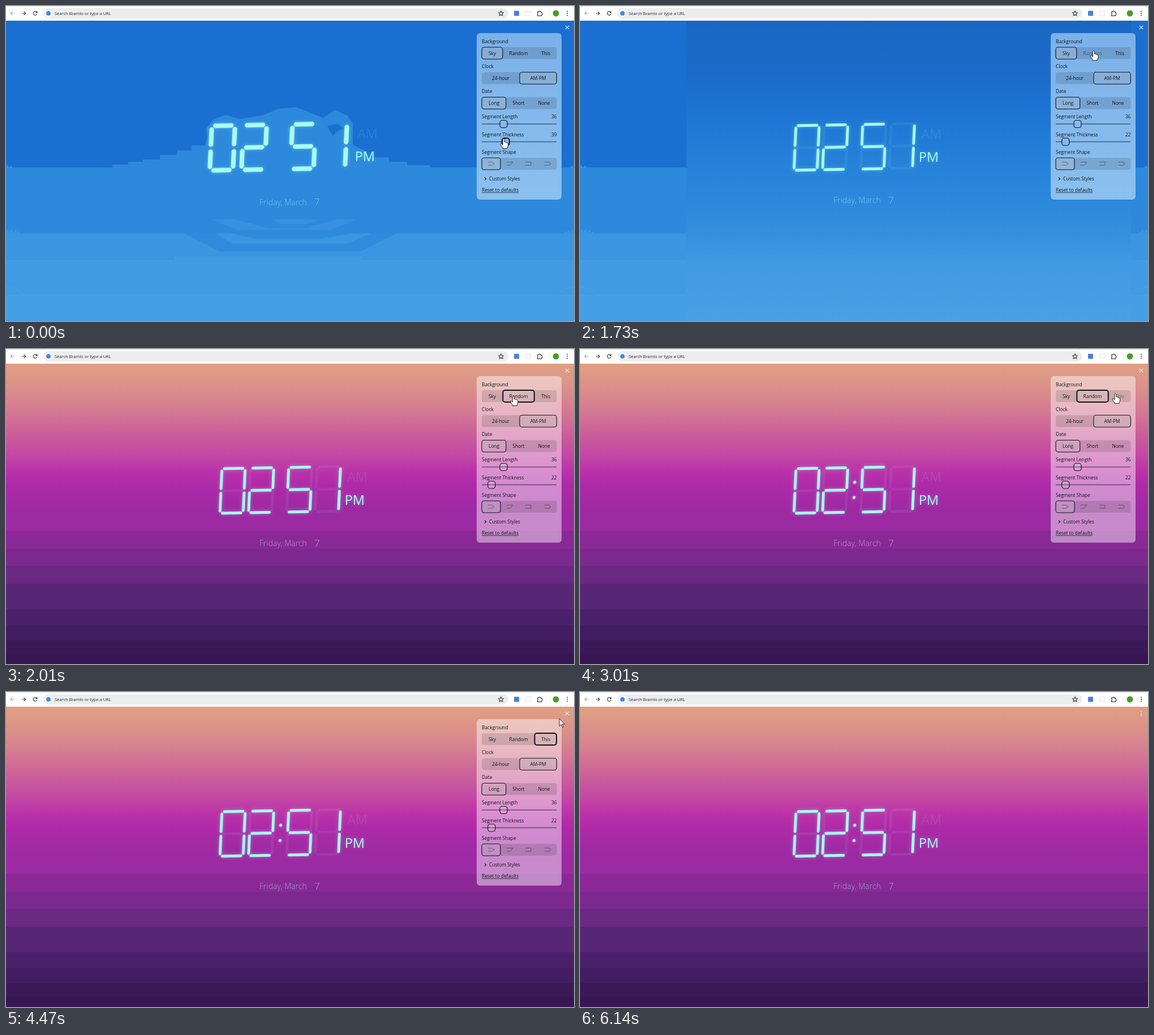
Write an HTML page that moves like this. It is 1004 px wide and 558 px high and loops after 6.79 s.

```html
<!DOCTYPE html>
<html lang="en">
<head>
<meta charset="utf-8">
<title>Segment clock</title>
<style>
  html, body { margin: 0; width: 100%; height: 100%; overflow: hidden; background: #fff; }
  svg { display: block; width: 1004px; height: 558px; }
  text { font-family: "Open Sans", "Noto Sans", sans-serif; }
  .ui { font-size: 8.35px; fill: #10151c; }
  .mid { text-anchor: middle; }
  .end { text-anchor: end; }
  .group { fill: #000; fill-opacity: .12; }
  .pick { fill: #fff; fill-opacity: .17; stroke: #10151c; stroke-width: 1.1; }
  .track { stroke: #000; stroke-opacity: .5; stroke-width: 1.6; }
  .knob { stroke: #10151c; stroke-width: 1.2; }
  .icon { fill: none; stroke: #000; stroke-opacity: .5; stroke-width: .8; }
  .bar { fill: none; stroke: #3c4043; stroke-width: 1.2; }
  .aqua { fill: #a7fdf0; }
  .lit { filter: drop-shadow(0 0 3px rgba(167, 253, 240, .35)); }
  .date { font-family: Inter, Lato, sans-serif; font-weight: 300; font-size: 13.8px; letter-spacing: .12px; fill-opacity: .58; }
</style>
</head>
<body>
<svg viewBox="0 0 1004 558" xmlns="http://www.w3.org/2000/svg">
  <defs id="defs"></defs>

  <g id="sky">
    <rect y="26" width="1004" height="262" fill="#1a6fd0"/>
    <rect y="286" width="1004" height="118" fill="#2c89dc"/>
    <rect y="403" width="1004" height="155" fill="#3b95e0"/>
    <rect y="450" width="1004" height="108" fill="#429ae2"/>
    <rect y="512" width="1004" height="46" fill="#469ee4"/>
    <path d="M0 287l2-7 3 7 4-5 3 5zM0 404l3-10 3 8 5-8 1 8 7-7-1 7 8-3-4 5zM1004 404l-3-9-3 7-5-6 0 6-8-4 4 6zM1004 287l-4-5-3 5z" fill="#3b95e0"/>
    <path d="M0 498q22 2 28 13H976q6-11 28-13" fill="none" stroke="#58a9e8" stroke-opacity=".45"/>
    <g id="early">
      <path d="M188 288V281h28v-5h26v-4h30v-8h30v-8h26v-9h24l4-14-2-16 12-16 22-8 25 7 40-6 28-12 32-3 30 12 18 7 20-14 22 10 10 14 0 38 24 12v10h40v8h32v6h41v6h170v5z" fill="#2c89dc"/>
      <path d="M568 212l18-3 12 8-13 5-7 8-6-9z" fill="#1a6fd0"/>
      <path d="M363 378h42l58 15h70l50-15h37l-46 19H410zM470 378h90l-28 8h-46z" fill="#3990de"/>
      <path d="M315 403l62 31H628l62-31h-44l-44 18H400l-30-18zM400 403l40 9H560l48-9z" fill="#2f8bdc"/>
      <rect x="298" y="444" width="330" height="5" fill="#439be2"/>
    </g>
    <rect id="late" x="188" y="26" width="786" height="532" fill="url(#gSky)"/>
  </g>
  <rect id="sun" y="26" width="1004" height="532" fill="url(#gSun)"/>

  <rect width="1004" height="26" fill="#fff"/>
  <rect width="1004" height="1" fill="#e4e4e6"/>
  <rect x="66" y="4" width="822" height="18" rx="9" fill="#ededef"/>
  <circle cx="75" cy="13" r="6.8" fill="#fff"/>
  <circle cx="75" cy="13" r="4" fill="#4285f4"/>
  <text x="86" y="15.6" font-size="7.5" fill="#26282b">Search Bramlo or type a URL</text>
  <path class="bar" stroke-opacity=".45" d="M15 13H8.5M11.5 9.8 8.3 13l3.2 3.2"/>
  <path class="bar" d="M28 13h6.5M31.5 9.8l3.2 3.2-3.2 3.2M54.3 11.2a3.3 3.3 0 1 0 .4 2.6M54.9 9.3v2.6h-2.6"/>
  <path class="bar" stroke-width="1" d="M875 8.6l1.3 2.9 3.1.3-2.3 2.1.7 3.1-2.8-1.6-2.8 1.6.7-3.1-2.3-2.1 3.1-.3z"/>
  <rect x="898" y="8.5" width="9" height="9" rx="1" fill="#4b7fd6"/>
  <rect x="919" y="9" width="8" height="8" fill="none" stroke="#e0e0e2"/>
  <path class="bar" d="M939.5 10.3h2.2a1.4 1.4 0 0 1 2.8 0h2.2v2.2a1.4 1.4 0 0 1 0 2.8v2h-7.2v-2.2a1.5 1.5 0 0 0 0-2.8z"/>
  <path d="M961 9v8" stroke="#dce4f4"/>
  <circle cx="972" cy="13" r="5.5" fill="#4c9a2a"/>
  <g fill="#3c4043"><circle cx="992" cy="9.6" r="1"/><circle cx="992" cy="13" r="1"/><circle cx="992" cy="16.4" r="1"/></g>

  <g transform="matrix(1 -.018 -.045 1 505 249.2)" class="aqua">
    <path id="ghost" fill-opacity=".08"/>
    <path id="digits" class="lit"/>
    <g id="colon" class="lit"><circle cy="-13.5"/><circle cy="13.5"/></g>
  </g>
  <g id="half" class="aqua" font-size="23.5">
    <text id="am" y="235" fill-opacity=".11">AM</text>
    <text class="lit" y="276" x="-2.3">PM</text>
  </g>
  <g id="date" class="aqua date"><text x="448">Friday, March</text><text x="545" y=".6" font-size="17">7</text></g>

  <g id="panel">
    <rect x="832" y="48" width="150" height="295" rx="6" fill="url(#gPanel)"/>
    <g id="warm">
      <rect x="832" y="48" width="150" height="295" rx="6" fill="url(#gSun)"/>
      <rect x="832" y="48" width="150" height="295" rx="6" fill="#fff" fill-opacity=".45"/>
    </g>
    <g id="controls"></g>
    <path d="M988.8 34.8l6.4 6.4M995.2 34.8l-6.4 6.4" stroke="#cdf8fa" stroke-width="1.2"/>
  </g>
  <g id="menu" fill="#b9f3ee"><circle cx="992" cy="34.7" r="1.1"/><circle cx="992" cy="38.2" r="1.1"/><circle cx="992" cy="41.7" r="1.1"/></g>

  <g id="cursor" fill="#fff" stroke="#111" stroke-width=".9" stroke-linejoin="round">
    <path id="hand" d="M-1.5 1.2Q0-1 1.5 1.2V6q1.6-.9 2.3.5 1.7-.6 2.2.8 1.8-.3 2 1.4V12q0 2-1.4 3.600V17.500H-1.800V15.800Q-3.500 14-5.300 10.300q-.6-1.800 1.300-1.600L-1.500 11z"/>
    <path id="arrow" d="M0 0V13.500l3.100-2.900 2.200 5 2-.9-2.200-4.800h4.300z"/>
  </g>
</svg>
<script>
const $ = id => document.getElementById(id);
const LOOP = 6790;
// Moments at which the picture is refreshed
const TICKS = [0, 150, 280, 410, 540, 660, 790, 910, 1050, 1180, 1330, 1460, 1600, 1730, 1860, 2010, 2150, 2310,
  2440, 2590, 2730, 2870, 3010, 3170, 3320, 3470, 3590, 3730, 3880, 4030, 4180, 4330, 4470, 4600,
  4720, 4860, 5010, 5150, 5290, 5440, 5580, 5720, 5870, 6000, 6140];
const POINTER = [[0, 879.5, 235], [150, 877, 236], [540, 859, 238], [660, 858, 238], [790, 861, 238.5], [910, 866, 228],
  [1050, 888, 140], [1180, 903, 68], [1330, 906, 76], [1730, 908, 79], [1860, 896.5, 83], [2440, 898, 83],
  [3010, 946.5, 79], [3320, 948, 81], [3880, 950, 81], [4180, 958, 72], [4470, 978, 47], [4600, 981, 43],
  [4720, 986, 37], [5290, 989, 35], [5580, 972, 40], [5720, 946, 51], [5870, 800, 190], [6000, 620, 329]];
const THICKNESS = [[0, 39], [150, 36], [540, 21], [660, 20], [790, 22]];
const RANDOM_AT = 1733, THIS_AT = 3190, CLOSE_AT = 5150;

const clamp = v => Math.max(0, Math.min(1, v));
const mix = (a, b, p) => a + (b - a) * p;
const show = (id, on) => $(id).setAttribute('visibility', on ? 'inherit' : 'hidden');
const set = (id, attrs) => { for (const k in attrs) $(id).setAttribute(k, attrs[k]); };

function along(keys, t) {
  const i = keys.findIndex(k => k[0] > t);
  if (i < 0) return keys[keys.length - 1].slice(1);
  if (!i) return keys[0].slice(1);
  const a = keys[i - 1], b = keys[i], p = (t - a[0]) / (b[0] - a[0]);
  return a.slice(1).map((v, j) => mix(v, b[j + 1], p));
}

// Vertical gradient; stops from `flat` on become solid bands
function gradient(id, stops, flat = Infinity) {
  const stop = (y, c) => `<stop offset="${(y - 26) / 532}" stop-color="#${c}"/>`;
  const body = stops.map(([y, c], i) =>
    (i && y >= flat ? stop(y, stops[i - 1][1]) : '') + stop(y, c)).join('');
  $('defs').innerHTML += `<linearGradient id="${id}" gradientUnits="userSpaceOnUse" x1="0" x2="0" y1="26" y2="558">${body}</linearGradient>`;
}
gradient('gSky', [[26, '1a67c2'], [130, '1b6ccb'], [200, '1e76d4'], [285, '2682d9'], [350, '2c89dc'],
  [403, '358fdd'], [460, '429ae2'], [558, '4aa0e4']]);
gradient('gSun', [[26, 'e0a083'], [60, 'dc9489'], [100, 'd67f90'], [150, 'cb5f9a'], [190, 'c346a5'], [215, 'bb33a8'],
  [240, 'ae2aa8'], [290, '9c2aa2'], [322, '8a2996'], [354, '7b298e'], [384, '6a2983'], [416, '572675'],
  [461, '4b216b'], [489, '431d62'], [516, '3b1957'], [540, '381653']], 322);
gradient('gPanel', [[48, '7bb1e9'], [343, '8bc0ef']]);

// Settings panel
const rect = (cls, x, y, w, h, extra = '') => `<rect class="${cls}" x="${x}" y="${y}" width="${w}" height="${h}" rx="4" ${extra}/>`;
const label = (x, y, s, cls = '', id = '') => `<text class="ui ${cls}" x="${x}" y="${y}" ${id && `id="${id}"`}>${s}</text>`;
const choices = (y, picked, names) => rect('group', 841, y, 132.5, 21) + rect('pick', ...picked) +
  names.map(([x, s, id]) => label(x, y + 13.6, s, 'mid', id)).join('');
const slider = (y, name, value, x, id) => label(841, y - 10, name) + label(973.5, y - 10, value, 'end', id + 'Value') +
  `<path class="track" d="M841 ${y}H973"/>` + rect('knob', x - 6.5, y - 6.5, 13, 13, `id="${id}Knob"`);
$('controls').innerHTML =
  label(841, 65.8, 'Background') +
  choices(73, [841, 73, 37, 21, 'id="choice"'], [[859.5, 'Sky'], [906, 'Random', 'random'], [954, 'This', 'this']]) +
  label(841, 110, 'Clock') + choices(117.3, [908, 117.3, 65.3, 21], [[874.5, '24-hour'], [940.5, 'AM-PM']]) +
  label(841, 154.300, 'Date') + choices(161.5, [841, 161.5, 42.7, 21], [[862.5, 'Long'], [906, 'Short'], [951, 'None']]) +
  slider(209, 'Segment Length', 36, 879.5, 'length') +
  slider(240.5, 'Segment Thickness', 39, 883.5, 'thick') +
  label(841, 262, 'Segment Shape') + choices(269, [841, 269, 33, 21], []) +
  '<path class="icon" d="M852 276.500h7l4 2.800-4 2.800h-7M885 276.500h11l-5 5.600h-6M918 276.500h10v5.600h-10M952 276.500h7.500a2.800 2.800 0 0 1 0 5.600H952"/>' +
  '<path d="M846 303.600l2.600 2.500-2.600 2.500" fill="none" stroke="#10151c" stroke-width="1.200"/>' +
  label(854, 309, 'Custom Styles') + label(841, 329, 'Reset to defaults') +
  '<path d="M841 330.600h65" stroke="#10151c" stroke-width=".7"/>';

// Seven segments: centre x, centre y, vertical?
const W = 20.5, H = 39.5;
const SEGMENTS = { a: [0, -H, 0], b: [W, -H / 2, 1], c: [W, H / 2, 1], d: [0, H, 0], e: [-W, H / 2, 1], f: [-W, -H / 2, 1], g: [0, 0, 0] };
const NUMBERS = ['abcdef', 'abged', 'afgcd', 'bc'];

function segment(cx, [x, y, upright], h) {
  const n = (upright ? H / 2 : W) - h * .5 - .5, s = n - h * .6, q = h * .4;
  const pts = [[-n, -q], [-s, -h], [s, -h], [n, -q], [n, q], [s, h], [-s, h], [-n, q]];
  return 'M' + pts.map(([u, v]) => upright ? [cx + x + v, y + u] : [cx + x + u, y + v])
    .map(p => p.map(v => v.toFixed(2)).join(' ')).join('L') + 'Z';
}

function drawClock(t) {
  const k = (along(THICKNESS, t - 100)[0] - 22) / 17;
  const h = 2.45 + 1.6 * k;
  const centres = [-104.5 - 18 * k, -54 - 12.5 * k, 13.5 + 6.5 * k, 64 + 11.5 * k];
  const build = lit => centres.map((c, i) => Object.keys(SEGMENTS)
    .filter(s => NUMBERS[i].includes(s) === lit)
    .map(s => segment(c, SEGMENTS[s], h)).join('')).join('');
  set('digits', { d: build(true) });
  set('ghost', { d: build(false) });
  show('ghost', t >= 150);
  for (const dot of $('colon').children) {
    dot.setAttribute('cx', -20 - 3.5 * k);
    dot.setAttribute('r', 2.7 + .8 * k);
  }
  show('colon', (t + 1860) % 2000 < 1010);
  set('half', { transform: `translate(${601 + 18 * k} ${-.7 * k})` });
  set('am', { x: 2 });
  set('date', { transform: `translate(0 ${349 + 3.5 * k})` });
}

function drawPanel(t) {
  const value = along(THICKNESS, t)[0];
  const ease = from => 1 - (1 - clamp((t - from) / 240)) ** 2.6;
  const toRandom = ease(RANDOM_AT), toThis = ease(THIS_AT);
  const left = mix(mix(841, 878.3, toRandom), 934.5, toThis);
  const right = mix(mix(877.8, 933.8, toRandom), 973, toThis);
  set('choice', { x: left, width: right - left, style: `stroke-width:${t >= RANDOM_AT ? 2 : 1.1}` });
  set('random', { opacity: t >= 1330 && t < RANDOM_AT ? .5 : 1 });
  set('this', { opacity: t >= 2870 && t < THIS_AT ? .5 : 1 });
  $('thickValue').textContent = Math.round(value);
  const warm = t >= RANDOM_AT;
  set('thickKnob', { x: 851.8 + (value - 22) * 1.47, style: `stroke-width:${t < 1700 ? 2 : 1.2}` });
  for (const id of ['lengthKnob', 'thickKnob']) set(id, { fill: warm ? '#fff' : '#84b9ec', 'fill-opacity': warm ? .12 : 1 });
  set('warm', { opacity: toRandom });
  show('panel', t < CLOSE_AT);
  show('menu', t >= CLOSE_AT);
}

function draw(t) {
  show('early', t < 150);
  show('late', t >= 150);
  set('sun', { opacity: clamp((t - RANDOM_AT) / 235) });
  drawClock(t);
  drawPanel(t);
  const [x, y] = along(POINTER, t);
  const arrow = (t >= 4330 && t < 4720) || t >= 5500;
  set('cursor', { transform: `translate(${x} ${y})` });
  show('cursor', t < 6140);
  show('hand', !arrow);
  show('arrow', arrow);
}

const start = performance.now();
let last = -1;
function frame() {
  const t = (performance.now() - start) % LOOP;
  const tick = TICKS.filter(v => v <= t).pop();
  if (tick !== last) draw(last = tick);
  requestAnimationFrame(frame);
}
frame();
</script>
</body>
</html>
```
